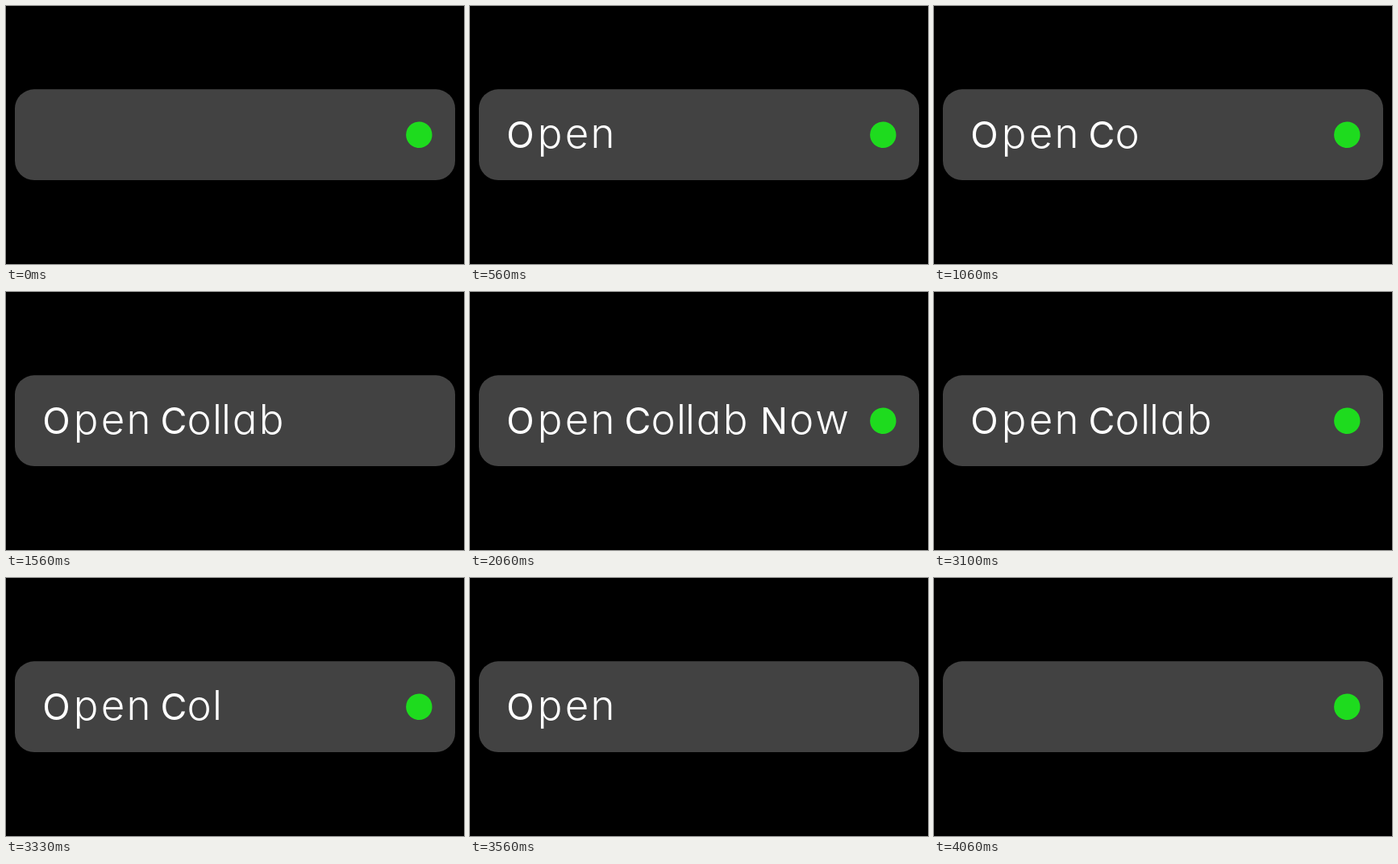
Animation, 568 px wide and 320 px high, one loop 4.1 s. Source, as an HTML page:

```html
<!DOCTYPE html>
<html lang="en">
<head>
<meta charset="utf-8">
<title>Open Collab Now</title>
<style>
  html, body { margin: 0; width: 100%; height: 100%; overflow: hidden; background: #000; }
  svg { display: block; width: 568px; height: 320px; }
  text {
    font: 350 51px Inter, sans-serif;
    font-feature-settings: "cv11"; /* single-storey a */
    text-anchor: middle;
    fill: #fff;
  }
  .capital { font-size: 45px; font-weight: 400; }
</style>
</head>
<body>
<svg viewBox="0 0 568 320">
  <rect x="11" y="103.3" width="546" height="112.7" rx="24" fill="#424242"/>
  <text id="phrase" y="176"></text>
  <circle id="dot" cx="512.3" cy="159.8" r="16.2" fill="#1edb1e"/>
</svg>
<script>
  const LOOP = 4100;
  const FPS = 30;
  const TYPE_START = 5, TYPE_STEP = 4;
  const ERASE_START = 89, ERASE_STEP = 13 / 7;
  const BLINKS = [18, 32, 47, 62, 78, 92, 107, 122];

  const text = "Open Collab Now";
  const centres = [62.5, 99, 132.5, 164.5, 185, 208, 239.5, 262, 273, 296, 329, 353, 377, 411, 449];

  const phrase = document.getElementById("phrase");
  const dot = document.getElementById("dot");

  const letters = [...text].map((char, i) => {
    const span = document.createElementNS(phrase.namespaceURI, "tspan");
    span.textContent = char;
    span.setAttribute("x", centres[i]);
    if (/[A-Z]/.test(char)) span.setAttribute("class", "capital");
    phrase.append(span);
    return span;
  });

  function lettersShown(tick) {
    const typed = Math.floor((tick - TYPE_START) / TYPE_STEP) + 1;
    const erased = Math.floor((tick - ERASE_START + 0.5) / ERASE_STEP) + 1;
    return Math.min(typed, text.length) - Math.max(erased, 0);
  }

  function show(element, visible) {
    element.setAttribute("visibility", visible ? "visible" : "hidden");
  }

  function draw() {
    const time = performance.now() % LOOP;
    const tick = Math.floor((time + 7) * FPS / 1000); // ticks start on whole hundredths
    const count = lettersShown(tick);
    letters.forEach((letter, i) => show(letter, i < count));
    show(dot, BLINKS.filter(blink => blink <= tick).length % 2 === 0);
    requestAnimationFrame(draw);
  }

  draw();
</script>
</body>
</html>
```
